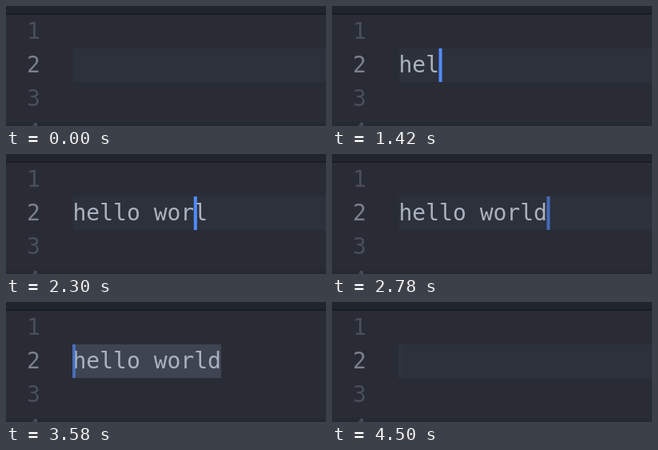
Recreate the animation shown at these times as an HTML page. Size 400x150 px, loop 4560 ms.

```html
<!DOCTYPE html>
<html lang="en">
<head>
<meta charset="utf-8">
<title>Smooth caret</title>
<style>
  html, body { margin: 0; width: 100%; height: 100%; overflow: hidden; background: #292c35; }
  svg { display: block; width: 100vw; height: 100vh; }
  text { font: 28px "DejaVu Sans Mono", monospace; white-space: pre; }
</style>
</head>
<body>
<svg viewBox="0 0 400 150">
  <rect width="400" height="150" fill="#292c35"/>
  <rect y="146" width="400" height="4" fill="#272932"/>
  <rect width="400" height="9" fill="#21252c"/>
  <rect y="9" width="400" height="2" fill="#1a1c21"/>
  <rect id="line" x="83.5" y="53" width="316.5" height="42" fill="#2c313b"/>
  <rect id="selection" x="83.5" y="53" width="185.4" height="42" fill="#3e4451"/>
  <g fill="#4a4e5c">
    <text x="26" y="41">1</text>
    <text x="26" y="83" fill="#7c808c">2</text>
    <text x="26" y="125">3</text>
    <text x="26" y="167">4</text>
  </g>
  <text id="code" x="83.5" y="83" fill="#abb2bf"></text>
  <rect id="caret" y="53" width="4" height="42" fill="#528bff"/>
</svg>
<script>
const LOOP = 4560, CHAR = 16.857, LEFT = 83;
const MESSAGE = "hello world";
const KEYS = [1020, 1160, 1300, 1430, 1570, 1760, 1920, 2100, 2180, 2300, 2400];
const SELECT = 3140, REMOVE = 3880;
const SLIDE = 120, FADE = 400;

// Each entry is [start time, new value]
const columns = [[-LOOP, 0], ...KEYS.map((time, i) => [time, i + 1]), [SELECT, 0]];
const visibility = [[-LOOP, 0], [525, 1], [2690, 0], [SELECT, 1], [3485, 0], [REMOVE, 1], [4185, 0]];

const $ = id => document.getElementById(id);

// CSS "ease": cubic-bezier(.25, .1, .25, 1)
function ease(x) {
  if (x <= 0) return 0;
  if (x >= 1) return 1;
  const bezier = (a, b, s) => 3 * a * s * (1 - s) ** 2 + 3 * b * s * s * (1 - s) + s ** 3;
  let low = 0, high = 1;
  for (let i = 0; i < 20; i++) {
    const mid = (low + high) / 2;
    if (bezier(.25, .25, mid) < x) low = mid; else high = mid;
  }
  return bezier(.1, 1, low);
}

// Value at a time when every change eases on from wherever the last one had got to
function transition(changes, duration, time) {
  let value = changes[0][1];
  changes.forEach(([start, goal], i) => {
    if (time < start) return;
    const end = i + 1 < changes.length ? Math.min(time, changes[i + 1][0]) : time;
    value += (goal - value) * ease((end - start) / duration);
  });
  return value;
}

function draw(time) {
  const selected = time >= SELECT && time < REMOVE;
  const typed = time < REMOVE ? KEYS.filter(key => key <= time).length : 0;
  $("code").textContent = MESSAGE.slice(0, typed);
  $("selection").setAttribute("visibility", selected ? "visible" : "hidden");
  $("line").setAttribute("visibility", selected ? "hidden" : "visible");
  $("caret").setAttribute("x", LEFT + CHAR * transition(columns, SLIDE, time));
  $("caret").setAttribute("opacity", transition(visibility, FADE, time));
}

const begin = performance.now();
function tick() {
  draw((performance.now() - begin) % LOOP);
  requestAnimationFrame(tick);
}
tick();
</script>
</body>
</html>
```
